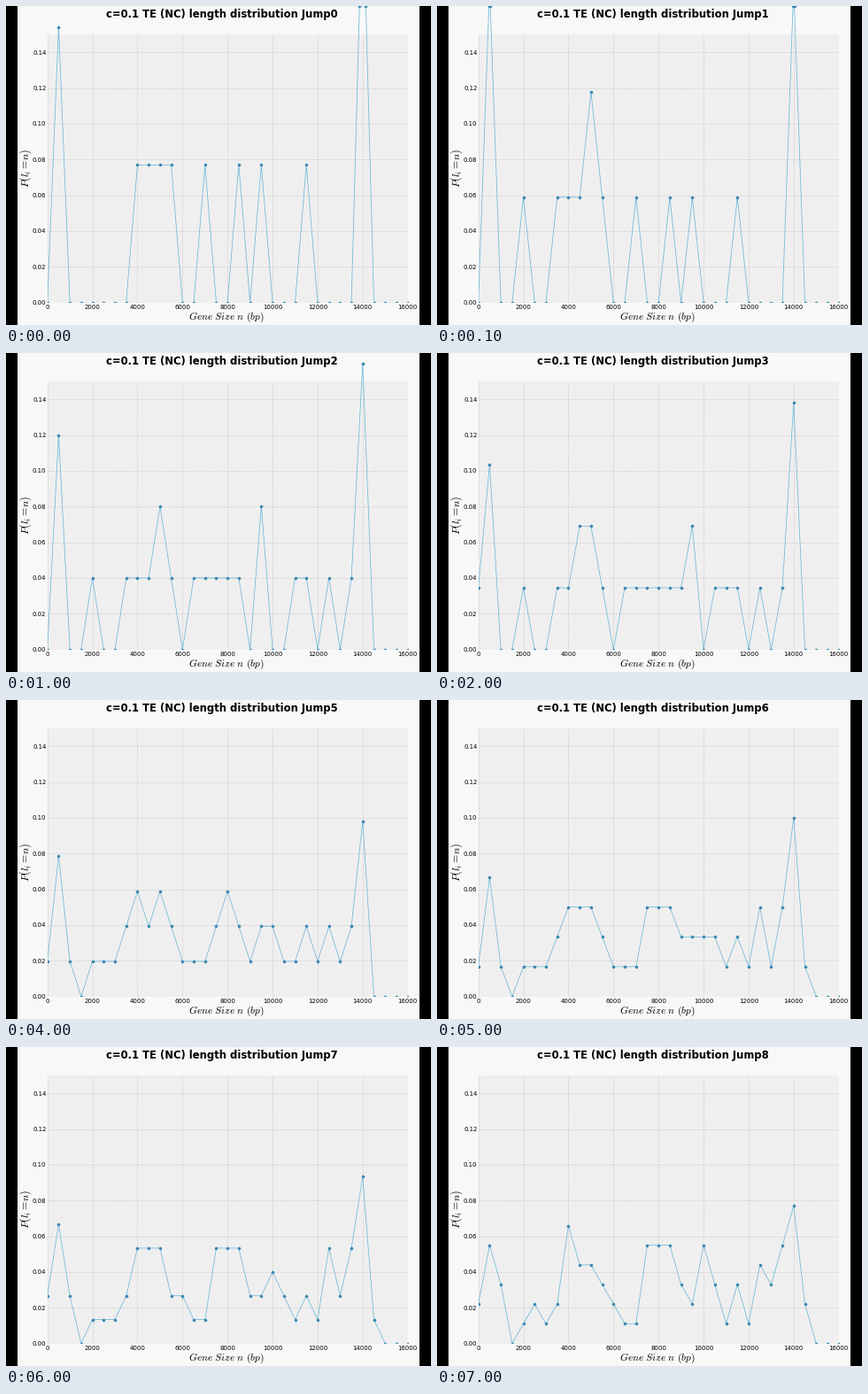
These frames come from a looping animation (480x360 px, 8 s). A matplotlib script:

```python
import numpy as np
import matplotlib.pyplot as plt
from matplotlib.animation import FuncAnimation
from matplotlib.patches import Rectangle
from matplotlib.transforms import Bbox

W, H, DPI = 480, 360, 100
PX = 72 / DPI                                       # points per pixel
LEFT, RIGHT, TOP, BASE = 46.7, 453.7, 32, 334.5     # plot area, y measured downwards
BIN, BINS, Y_MAX = 500, 33, 0.15
Y_EDGE = Y_MAX * BASE / (BASE - TOP)                # value at the top edge of the stage

plt.rcParams.update({"font.family": "DejaVu Sans", "mathtext.fontset": "cm"})

# Bins of the first elements, element counts per bin after the last jump,
# and the number of elements after each jump.
FIRST = [1, 1, *range(8, 12), 14, 17, 19, 23, 28, 28, 28]
LAST = [2, 5, 3, 0, 1, 2, 1, 2, 6, 4, 4, 3, 2, 1, 1,
        5, 5, 5, 3, 2, 5, 3, 1, 3, 1, 4, 3, 5, 7, 2]
TOTALS = [13, 17, 25, 29, 43, 51, 60, 75, 91]
sizes = np.arange(BINS) * BIN


def growth_order():
    """New elements spread evenly over time, each third bin starting first."""
    extra = np.array(LAST) - np.bincount(FIRST, minlength=len(LAST))
    arrivals = [((k + (1 - b) % 3 / 2) / (n + 1), b)
                for b, n in enumerate(extra) for k in range(n)]
    return [b for _, b in sorted(arrivals)]


elements = FIRST + growth_order()


def distribution(jump):
    total = TOTALS[jump]
    return np.bincount(elements[:total], minlength=BINS) / total


def edge_crossings(p):
    """Sizes at which the curve leaves through the top edge of the stage."""
    i = np.flatnonzero((p[:-1] > Y_EDGE) != (p[1:] > Y_EDGE))
    return sizes[i] + BIN * (Y_EDGE - p[i]) / (p[i + 1] - p[i])


fig = plt.figure(figsize=(W / DPI, H / DPI), dpi=DPI, facecolor="#f8f8f8")
for x in (0, 467):
    fig.add_artist(Rectangle((x / W, 0), 13 / W, 1, color="black", lw=0))

ax = fig.add_axes([LEFT / W, 1 - BASE / H, (RIGHT - LEFT) / W, (BASE - TOP) / H],
                  facecolor="#efefef")
ax.set(xlim=(0, 16000), ylim=(0, Y_MAX),
       xticks=np.arange(0, 16001, 2000), yticks=np.arange(8) * 0.02)
ax.yaxis.set_major_formatter("{x:.2f}")
ax.spines[:].set_visible(False)
ax.set_axisbelow(True)
ax.grid(color="#cdcdcd", lw=0.7 * PX, ls=(0, (3, 1.5)))
ax.tick_params(length=0, labelsize=6.9 * PX)
ax.tick_params(axis="x", pad=2.5 * PX)
ax.tick_params(axis="y", pad=1.3 * PX)


def label(x, y, text, size, **style):
    return fig.text(x / W, 1 - y / H, text, fontsize=size * PX, ha="center", **style)


title = label(243.5, 12.7, "", 11.6, weight="bold", va="baseline")
label(249.3, 351.3, r"$Gene\ Size\ n\ (bp)$", 11.5, va="center")
label(22.2, 183, r"$P(l_i=\!n)$", 12, va="center", rotation=90)

dots = dict(marker="o", ms=3.2 * PX, mfc="#3a88b4", mec="#3580a8", mew=0.3 * PX)
curve, = ax.plot([], [], color="#6ab6d8", lw=0.75 * PX, **dots)
exits, = ax.plot([], [], ls="none", **dots)
# Open towards the top of the stage, cut just above the baseline.
visible = Bbox([[LEFT, H - BASE + 0.7], [RIGHT, H]])
for line in (curve, exits):
    line.set_clip_box(visible)


def update(frame):
    jump = 1 + frame // 10 if frame else 0
    p = distribution(jump)
    cross = edge_crossings(p)
    curve.set_data(sizes, p)
    exits.set_data(cross, np.full(len(cross), Y_EDGE))
    title.set_text(f"c=0.1 TE (NC) length distribution Jump{jump}")
    return curve, exits, title


anim = FuncAnimation(fig, update, frames=80, interval=100, repeat=True, repeat_delay=0)
plt.show()
```
